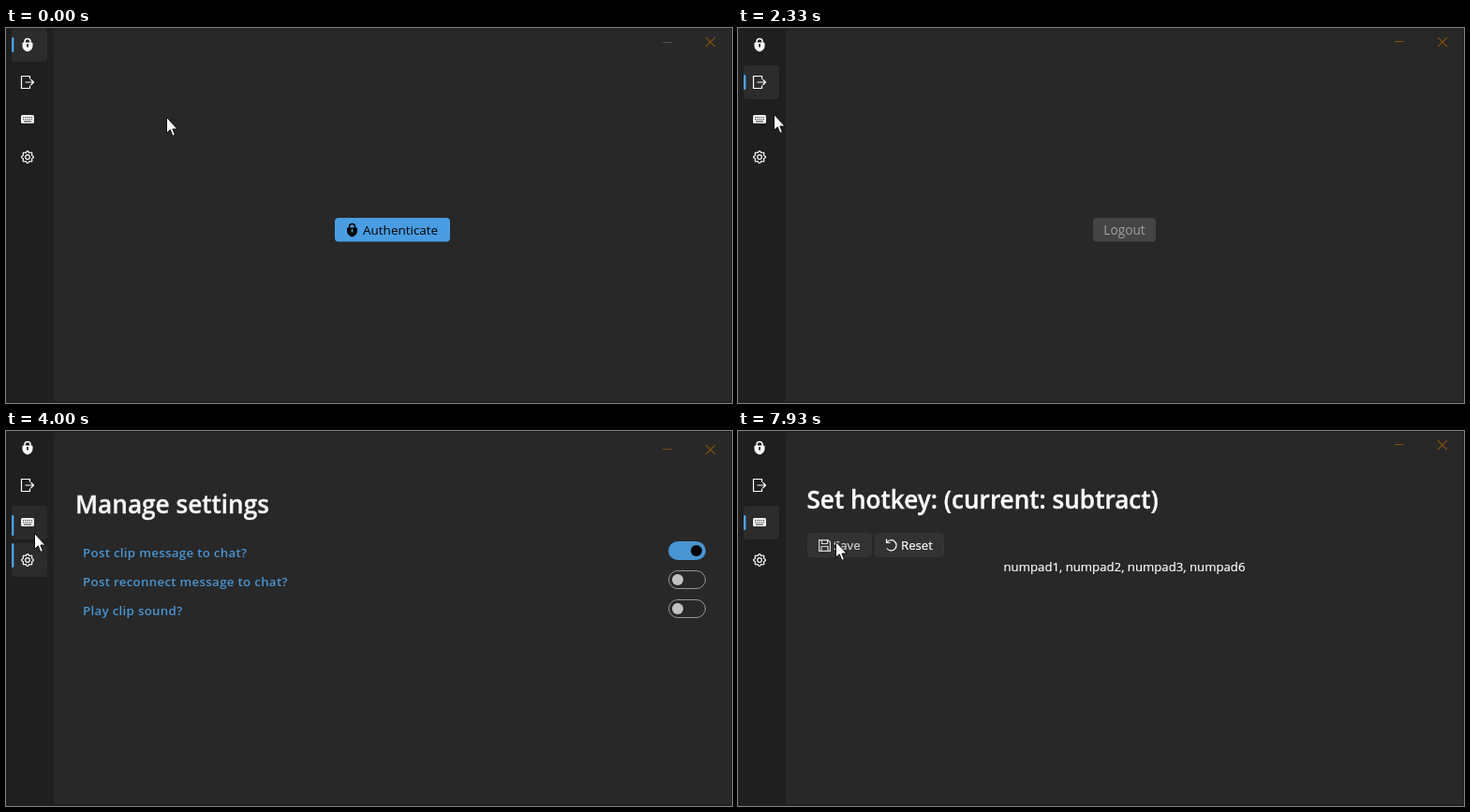
These frames come from a looping animation (775 by 401 pixels, 8000 ms). An HTML page:

```html
<!DOCTYPE html>
<html lang="en">
<head>
<meta charset="utf-8">
<title>Settings window</title>
<style>
  html, body { margin: 0; width: 100%; height: 100%; overflow: hidden; background: #1f1f1f; }
  svg { display: block; width: 775px; height: 401px; }
  text { font: 13.2px "Open Sans", "Noto Sans", sans-serif; fill: #fff; stroke: #fff; stroke-width: .2; white-space: pre; }
  .heading { font-size: 26.15px; font-weight: 600; stroke-width: .35; }
  .label { font-size: 13.3px; font-weight: 600; letter-spacing: .3px; fill: #4a98d8; stroke: none; }
  .button { fill: #323232; stroke: #363636; }
  .line { fill: none; stroke: #fff; stroke-width: 1.2; }
  .off { fill: none; stroke: #9b9b9b; }
</style>
</head>
<body>
<svg viewBox="0 0 775 401">
  <defs>
    <g id="lock">
      <path d="M-3-2V-3.500A3 3 0 0 1 3-3.500V-2" fill="none" stroke="currentColor" stroke-width="1.500"/>
      <path d="M-4.500-2.500H4.500Q5.500-2.500 5.500-1.500V1C5.500 4.500 3 6.500 0 7.200C-3 6.500-5.500 4.500-5.500 1V-1.500Q-5.500-2.500-4.500-2.500Z" fill="currentColor"/>
    </g>
    <g id="controls">
      <path d="M701 14.500H711" stroke="#7e4e0c"/>
      <path d="M747 10L757 20M757 10L747 20" stroke="#7e4e0c" stroke-width="1.200"/>
    </g>
  </defs>

  <rect width="775" height="401" fill="#1f1f1f"/>
  <path d="M51 399V5Q51 1 55 1H774V399Z" fill="#282828"/>

  <g id="highlights" fill="#fff"></g>
  <g id="icons">
    <use href="#lock" x="23" y="18" color="#fff"/>
    <path d="M23 17V20.500" stroke="#1f1f1f" stroke-width="1.800"/>
    <path class="line" d="M25.500 54.500V51.500H16.500V64.500H25.500V61.500M20.500 58H29.500M26.500 55L29.500 58L26.500 61"/>
    <rect x="16" y="93" width="14" height="9" rx="1.500" fill="#f2f2f2"/>
    <path d="M18 95.500H28M18 97.700H28" stroke="#333" stroke-dasharray="1.200 1"/>
    <path d="M19 100H27" stroke="#333"/>
    <g class="line" transform="translate(23 138)">
      <path id="gear"/><circle r="2.300"/>
    </g>
  </g>
  <rect id="oldBar" x="6" width="2.400" rx="1" fill="#4aa0e4"/>
  <rect id="newBar" x="6" width="2.400" rx="1" fill="#4aa0e4"/>

  <g class="page">
    <path d="M701 15.500H711" stroke="#505050"/>
    <path d="M747 10L757 20M757 10L747 20" stroke="#7e4e0c" stroke-width="1.200"/>
    <rect x="351" y="203" width="123" height="25.500" rx="4" fill="#4a9de2"/>
    <use href="#lock" x="369.500" y="216" color="#000"/>
    <path d="M369.500 215V218.500" stroke="#4a9de2" stroke-width="1.600"/>
    <text x="381" y="220.500" style="fill:#000;stroke:none;font-size:13.500px">Authenticate</text>
  </g>
  <g class="page">
    <use href="#controls"/>
    <rect x="379" y="203" width="67" height="25.500" rx="4" fill="#444"/>
    <text x="412.500" y="220.500" text-anchor="middle" style="fill:#a2a2a2;stroke:none;font-size:13.700px">Logout</text>
  </g>
  <g class="page">
    <use href="#controls"/>
    <text class="heading" x="73.500" y="83">Set hotkey: (current: subtract)</text>
    <rect class="button" x="74.500" y="109.500" width="68" height="25" rx="4"/>
    <rect class="button" x="146.500" y="109.500" width="73" height="25" rx="4"/>
    <g id="save">
      <path class="line" d="M86.600 116.600H96L98.400 119V128.400H86.600ZM89.500 116.600V120.500H95.500V116.600M89 128.400V123.500H96V128.400"/>
      <text x="102" y="127">Save</text>
    </g>
    <path class="line" d="M158.500 115.500V119.500H162.500M158.700 119.300A5.600 5.600 0 1 1 158.900 125.500"/>
    <text x="174" y="127">Reset</text>
    <text id="keys" x="412.500" y="150" text-anchor="middle"></text>
  </g>
  <g class="page">
    <use href="#controls"/>
    <text class="heading" x="74" y="83">Manage settings</text>
    <text class="label" x="82" y="130">Post clip message to chat?</text>
    <text class="label" x="82" y="161">Post reconnect message to chat?</text>
    <text class="label" x="82" y="192">Play clip sound?</text>
    <rect x="707" y="113" width="40" height="20" rx="10" fill="#4a9ad8"/>
    <circle cx="737" cy="123" r="6" fill="#000"/>
    <rect class="off" x="707.500" y="144.500" width="39" height="19" rx="9.500"/>
    <circle cx="717" cy="154" r="6" fill="#c8c8c8"/>
    <rect class="off" x="707.500" y="175.500" width="39" height="19" rx="9.500"/>
    <circle cx="717" cy="185" r="6" fill="#c8c8c8"/>
  </g>

  <path id="cursor" d="M.5.5V17.300L4.300 13.800L6.900 20.400L9.400 19.300L6.900 13H12Z" fill="#fff" stroke="#000" stroke-width=".9"/>
</svg>

<script>
const LOOP = 8000;
const BAR_LEAD = 40;   // the sidebar reacts this long before the page enters
const HOTKEY = 2;

// Page entrances: [start time, page index]
const visits = [[-2000, 0], [1427, 1], [2510, 2], [3853, 3], [4452, 2]];

const prompts = [
  [0, "Press up to 4 unique keyboard buttons!"],
  [5870, "numpad1"],
  [6000, "numpad1, numpad2"],
  [6270, "numpad1, numpad2, numpad3"],
  [6530, "numpad1, numpad2, numpad3, numpad6"]
];

// Pointer path: [time, x, y]
const pointer = [
  [0, 171, 95], [200, 150, 104], [400, 85, 95], [670, 32, 54], [1400, 32, 54],
  [1600, 34, 64], [1900, 37, 90], [2130, 37, 93], [2270, 37, 93], [2330, 38, 92],
  [3210, 38, 92], [3530, 31, 129], [3800, 31, 128], [4000, 30, 109], [4400, 30, 108],
  [4530, 83, 132], [4930, 347, 223], [5610, 347, 223], [5670, 347, 222],
  [7340, 347, 222], [7860, 104, 118]
];

const $ = id => document.getElementById(id);
const clamp = v => Math.max(0, Math.min(1, v));
const set = (el, attrs) => { for (const k in attrs) el.setAttribute(k, attrs[k]); };
const lastIndex = (list, t) => list.reduce((found, item, i) => item[0] <= t ? i : found, 0);

// cubic-bezier(.1, .9, .2, 1)
function decelerate(x) {
  x = clamp(x);
  let lo = 0, hi = 1;
  const curve = (u, a, b) => 3 * (1 - u) ** 2 * u * a + 3 * (1 - u) * u * u * b + u ** 3;
  for (let i = 0; i < 24; i++) {
    const mid = (lo + hi) / 2;
    if (curve(mid, .1, .2) < x) lo = mid; else hi = mid;
  }
  return curve(hi, .9, 1);
}

function gearPath(teeth, radius, depth) {
  const points = Array.from({ length: teeth * 8 }, (_, i) => {
    const angle = i / (teeth * 8) * 2 * Math.PI;
    const r = radius + depth * Math.cos(teeth * angle);
    return [r * Math.cos(angle), r * Math.sin(angle)].map(v => v.toFixed(2));
  });
  return `M${points.join("L")}Z`;
}

function pointerAt(t) {
  const i = lastIndex(pointer, t);
  const [t0, x0, y0] = pointer[i];
  const [t1, x1, y1] = pointer[i + 1] || [LOOP, x0, y0];
  const p = clamp((t - t0) / (t1 - t0));
  return [Math.round(x0 + (x1 - x0) * p), Math.round(y0 + (y1 - y0) * p)];
}

$("gear").setAttribute("d", gearPath(8, 5.7, .75));
const pages = [...document.querySelectorAll(".page")];
const highlights = pages.map((_, i) => {
  const box = document.createElementNS("http://www.w3.org/2000/svg", "rect");
  set(box, { x: 6, y: i * 40 + (i ? 0 : 1), width: 38, height: i ? 36 : 35, rx: 4 });
  return $("highlights").appendChild(box);
});

function drawPages(t) {
  const [start, current] = visits[lastIndex(visits, t)];
  const progress = decelerate((t - start) / 300);
  pages.forEach((page, i) => set(page, {
    display: i === current ? "inline" : "none",
    opacity: progress,
    transform: `translate(0 ${Math.round(140 * (1 - progress))})`
  }));
}

function drawBar(bar, item, direction, stretch, opacity) {
  const top = item * 40 + 10;
  set(bar, { y: direction < 0 ? top - stretch : top, height: 16 + stretch, opacity });
}

function drawSidebar(t, x, y) {
  const step = lastIndex(visits, t + BAR_LEAD);
  const [start, to] = visits[step];
  const from = step ? visits[step - 1][1] : to;
  const age = t + BAR_LEAD - start;
  const direction = Math.sign(to - from);

  const grow = clamp(age / 110) ** 2;
  const settle = decelerate((age - 270) / 350);
  const stretch = grow * (1 - settle);
  drawBar($("oldBar"), from, direction, 6 * stretch, step ? 1 - clamp((age - 270) / 150) : 0);
  drawBar($("newBar"), to, -direction, 10 * stretch, step ? grow : 1);

  highlights.forEach((box, i) => {
    const over = x < 44 && y >= i * 40 && y < i * 40 + 36;
    const hovered = over && i === HOTKEY && t > 3853;
    box.setAttribute("opacity", i === to ? (over ? .035 : .06) : hovered ? .05 : 0);
  });
}

function draw(now) {
  const t = now % LOOP;
  const [x, y] = pointerAt(t);
  drawPages(t);
  drawSidebar(t, x, y);
  $("keys").textContent = prompts[lastIndex(prompts, t)][1];
  $("save").setAttribute("opacity", t > 7800 ? .8 : 1);
  $("cursor").setAttribute("transform", `translate(${x} ${y})`);
}

const begin = performance.now();
function tick() {
  draw(performance.now() - begin);
  requestAnimationFrame(tick);
}
tick();
</script>
</body>
</html>
```
